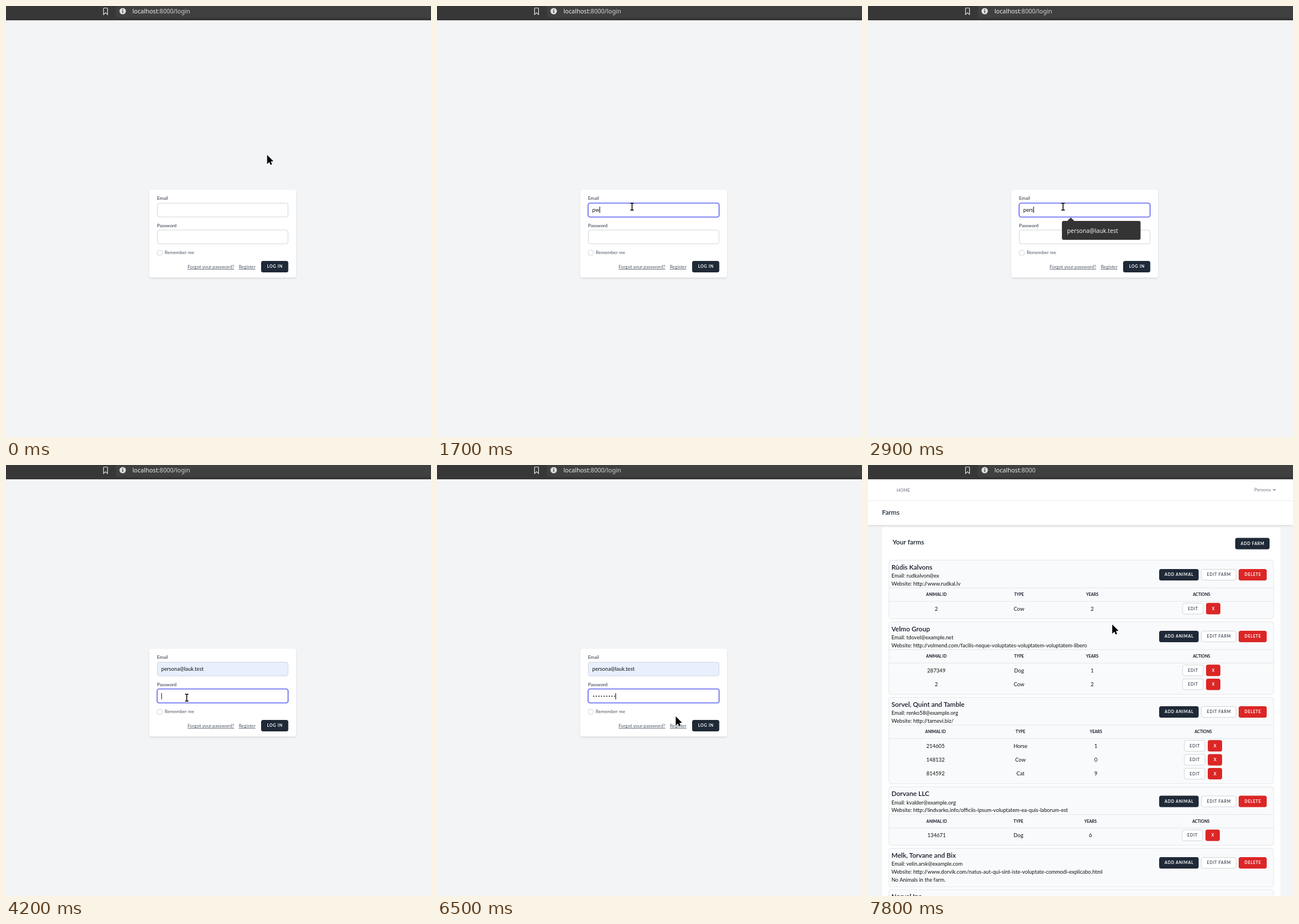
Animation of 743 by 754 pixels, one loop 8 s. Source, as an HTML page:

```html
<!DOCTYPE html>
<html lang="en">
<head>
<meta charset="utf-8">
<title>Farm login</title>
<style>
  html, body { margin: 0; width: 100%; height: 100%; overflow: hidden; background: #f3f4f6; }
  svg { display: block; width: 100%; height: 100%; font-family: Lato, "Open Sans", sans-serif; }
  .ui { font-family: "Noto Sans", "Open Sans", sans-serif; }
</style>
</head>
<body>
<svg id="stage" viewBox="0 0 743 754" xmlns="http://www.w3.org/2000/svg">
  <defs>
    <filter id="soft" x="-5%" y="-5%" width="110%" height="112%">
      <feDropShadow dx="0" dy="1.5" stdDeviation="1.5" flood-opacity=".12"/>
    </filter>
  </defs>
  <g id="login"></g>
  <g id="farms"></g>
  <g id="chrome"></g>
  <g id="pointer"></g>
</svg>
<script>
const LOOP = 8000, STEP = 100;
const INK = '#1f2937', RED = '#dc2626', LINE = '#d1d5db', RULE = '#e5e7eb', FOCUS = '#6366f1';
const EMAIL = 'persona@lauk.test';
const $ = id => document.getElementById(id);

const attrs = o => Object.entries(o).map(([k, v]) => ` ${k}="${v}"`).join('');
const rect = (x, y, width, height, fill, more = {}) =>
  `<rect${attrs({ x, y, width, height, fill, ...more })}/>`;
const text = (x, y, size, fill, str, more = {}) =>
  `<text${attrs({ x, y, 'font-size': size, fill, ...more })}>${str}</text>`;
const path = (d, more) => `<path${attrs({ d, fill: 'none', ...more })}/>`;
const mid = { 'text-anchor': 'middle' };
const hline = (x1, x2, y, color) => rect(x1, y, x2 - x1, 1, color);

function button(x, y, w, label, kind = 'dark') {
  const fill = { dark: INK, red: RED, plain: '#fff', hover: '#374151' }[kind];
  const plain = kind === 'plain';
  const edge = plain ? { stroke: LINE } : {};
  const inset = plain ? .5 : 0;
  return rect(x + inset, y + inset, w - 2 * inset, 20 - 2 * inset, fill, { rx: 3.5, ...edge }) +
    text(x + w / 2 + .35, y + 12.4, 6.9, plain ? '#374151' : '#fff', label,
      { ...mid, 'font-weight': plain ? 600 : 700, 'letter-spacing': '.1em' });
}

// Address bar
function chrome(url) {
  const [host, rest] = [url.slice(0, 9), url.slice(9)];
  return rect(0, 0, 743, 25, '#373737') +
    rect(192, -10, 560, 30.5, '#404040', { rx: 4 }) +
    rect(0, 24, 743, 1, '#303030') +
    path('M170.5 4.5Q170.5 3.5 171.5 3.5H176.5Q177.500 3.5 177.500 4.5V15L174 11.800 170.500 15Z',
      { stroke: '#e0e0e0', 'stroke-width': 1.2 }) +
    '<circle cx="204" cy="9" r="5.6" fill="#dedede"/>' +
    rect(203.3, 8, 1.5, 4, '#404040') + rect(203.3, 5.6, 1.5, 1.5, '#404040') +
    text(221, 13, 10.6, '#ededed', `${host}<tspan fill="#d2d2d2">${rest}</tspan>`, { class: 'ui' });
}

// Login form
function field(y, focused, fill = '#fff') {
  return focused
    ? rect(264.2, y + .2, 229, 24.6, fill, { rx: 3.5, stroke: FOCUS, 'stroke-width': 1.6 })
    : rect(264.5, y + .5, 228.5, 24, fill, { rx: 3.5, stroke: LINE });
}

const caret = (x, y) => rect(x, y, 1, 11, '#111');

function suggestions(list, width, hover) {
  const rowH = 28.25, h = 33 + rowH * (list.length - 1);
  return path('M347.500 377L354.500 370 361.500 377Z', { style: 'fill:#343434' }) +
    rect(339, 376, width, h, '#343434', { rx: 3 }) +
    (hover ? rect(339, 379, width, 27, '#4a4a4a') : '') +
    list.map((s, i) => text(348, 396.5 + i * rowH, 10.2, '#eee', s,
      { class: 'ui', 'font-weight': 500 })).join('');
}

const ALL = [EMAIL, 'pelde@lauk.test', 'paraugs.viens@lauk.test', 'pasts@lauk.test', 'plava@lauk.test'];
const typed = [[0, ''], [1600, 'p'], [1700, 'pw'], [2300, 'p'], [2500, 'pe'], [2700, 'per'], [2900, 'pers'], [3500, EMAIL]];
const dotTimes = [4700, 4800, 5000, 5200, 5400, 5500, 5900, 5900, 6100];
const between = (t, a, b) => t >= a && t < b;

function matches(t) {
  if (between(t, 1600, 1700) || between(t, 2300, 2500)) return ALL;
  if (between(t, 2500, 2700)) return ALL.slice(0, 2);
  return between(t, 2700, 3700) ? ALL.slice(0, 1) : [];
}

function login(t) {
  const value = typed.filter(k => t >= k[0]).pop()[1];
  const dots = dotTimes.filter(d => t >= d).length;
  const emailFocus = between(t, 600, 4100), passFocus = between(t, 4100, 6900);
  const list = matches(t);
  const [px, py] = pointerAt(t);
  const hover = px > 446 && px < 493 && py > 446 && py < 466;
  const fade = t < 6900 ? 1 : t < 7000 ? .85 : t < 7100 ? .45 : .25;
  let out = rect(250.5, 321.5, 256.5, 153.5, '#fff', { rx: 4, filter: 'url(#soft)' }) +
    text(264, 339.3, 8.1, '#374151', 'Email', { 'font-weight': 500 }) +
    field(344.5, emailFocus, t >= 3500 ? '#e8f0fe' : '#fff') +
    `<text id="entry" x="271.500" y="360" font-size="9.2" fill="#111">${value}</text>` +
    text(264, 386.600, 8.1, '#374151', 'Password', { 'font-weight': 500 }) +
    field(391.5, passFocus) +
    rect(264.5, 427.5, 8.500, 8.500, '#fff', { rx: 2, stroke: LINE }) +
    text(277.500, 434.2, 8.15, '#4b5563', 'Remember me');
  for (let i = 0; i < dots; i++)
    out += `<circle cx="${274 + 4.55 * i}" cy="404.5" r="1.05" fill="#111"/>`;
  for (const [x, label] of [[317.500, 'Forgot your password?'], [407, 'Register']])
    out += text(x, 459.2, 8.2, '#4b5563', label, { 'text-decoration': 'underline' });
  out += `<g opacity="${fade}">${button(446, 446, 47.5, 'LOG IN', hover ? 'hover' : 'dark')}</g>`;
  if (passFocus && t >= 4200 && t < 6600) out += caret(271.5 + 4.5 * dots, 399);
  if (list.length) out += suggestions(list, list.length > 2 ? 175 : 137.5, t >= 3500);
  $('login').innerHTML = out;
  if (between(t, 600, 1200) || between(t, 1600, 3500)) {
    const w = value ? $('entry').getComputedTextLength() : 0;
    $('login').insertAdjacentHTML('beforeend', caret(271.800 + w, 351));
  }
}

// Farm list
const COLS = [119.5, 264, 392, 583];
const FARMS = [
  { y: 166, name: 'Rūdis Kalvons', mail: 'rudkalvon@ex', site: 'www.rudkal.lv', cols: COLS, rows: [[2, 'Cow', 2]] },
  { y: 274, name: 'Velmo Group', mail: 'tdovel@example.net', cols: COLS,
    site: 'volmend.com/facilis-neque-voluptates-voluptatem-voluptatem-libero',
    rows: [[287349, 'Dog', 1], [2, 'Cow', 2]] },
  { y: 406, name: 'Sorvel, Quint and Tamble', mail: 'renko58@example.org', site: 'tarnevi.biz/',
    cols: [118, 266.5, 398.5, 586], rows: [[214605, 'Horse', 1], [148132, 'Cow', 0], [814592, 'Cat', 9]] },
  { y: 562.5, name: 'Dorvane LLC', mail: 'kvalder@example.org',
    site: 'lindvarko.info/officiis-ipsum-voluptatem-ea-quis-laborum-est',
    cols: [120, 263, 389, 582], rows: [[134671, 'Dog', 6]] },
  { y: 670, name: 'Melk, Torvane and Bix', mail: 'velin.arsk@example.com',
    site: 'www.dorvik.com/natus-aut-qui-sint-iste-voluptate-commodi-explicabo.html', rows: [] },
  { y: 742.5, name: 'Norvel Inc', mail: 'info@example.com', site: 'example.com', rows: [] }
];

function farm({ y, name, mail, site, cols, rows }) {
  const h = rows.length ? 78.5 + 24.4 * rows.length : 68;
  let out = rect(36.5, y + .5, 672.5, h - .5, '#f9fafb', { rx: 4, stroke: RULE }) +
    text(41, y + 16.5, 11.6, '#111827', name, { 'font-weight': 600 }) +
    text(41, y + 31, 9.2, '#111', `Email: ${mail}`) +
    text(41, y + 44.700, 9.2, '#111', `Website: http://${site}`) +
    button(509, y + 16, 69, 'ADD ANIMAL') +
    button(582.5, y + 16, 61.5, 'EDIT FARM', 'plain') +
    button(648, y + 16, 49, 'DELETE', 'red');
  if (!rows.length) return out + text(41, y + 58.5, 9.2, '#111', 'No Animals in the farm.');
  out += hline(37, 709, y + 48.5, RULE) + hline(37, 709, y + 72, RULE);
  ['ANIMAL ID', 'TYPE', 'YEARS', 'ACTIONS'].forEach((label, i) => {
    out += text(cols[i], y + 63, 6.9, '#111827', label, { ...mid, 'font-weight': 700 });
  });
  rows.forEach((row, r) => {
    const cy = y + 85.3 + 24.4 * r;
    row.forEach((v, i) => { out += text(cols[i], cy + 3.2, 9.2, '#111', v, mid); });
    out += button(cols[3] - 33.5, cy - 10, 37, 'EDIT', 'plain') +
      button(cols[3] + 8, cy - 10, 25, 'X', 'red');
  });
  return out;
}

$('farms').innerHTML =
  rect(0, 25, 743, 729, '#f3f4f6') +
  rect(0, 25, 743, 80, '#fff', { filter: 'url(#soft)' }) +
  hline(0, 743, 62, '#eceef1') +
  text(50, 47, 7.6, '#6b7280', 'HOME') +
  text(675.5, 46, 8.1, '#6b7280', 'Persona') +
  path('M708 42.2L710.300 44.500 712.600 42.2', { stroke: '#6b7280', 'stroke-width': 1.2 }) +
  text(24.5, 87, 11.6, INK, 'Farms', { 'font-weight': 600 }) +
  rect(25, 109, 696, 660, '#fff', { rx: 4 }) +
  text(43, 139, 11.6, '#111827', 'Your farms', { 'font-weight': 600 }) +
  button(642, 127.5, 60, 'ADD FARM') +
  FARMS.map(farm).join('');

// Pointer: time, x, y
const TRACK = [
  [100, 456.5, 260.5], [200, 468, 320], [300, 481, 442], [400, 430, 400], [500, 348, 354], [600, 341, 351],
  [3300, 341, 351], [3600, 372, 394], [3700, 372, 394], [3900, 340, 442], [4100, 316, 407],
  [6100, 316, 407], [6700, 468, 456], [7300, 468, 456], [7500, 463.5, 448],
  [7600, 463.5, 448], [7700, 440, 330], [7800, 427, 279]
];

function pointerAt(t) {
  const i = TRACK.findIndex(k => k[0] >= t);
  if (i < 0) return TRACK[TRACK.length - 1].slice(1);
  if (i === 0) return TRACK[0].slice(1);
  const [a, b] = [TRACK[i - 1], TRACK[i]];
  const p = (t - a[0]) / (b[0] - a[0]);
  return [1, 2].map(n => a[n] + (b[n] - a[n]) * p);
}

function pointer(t) {
  const [x, y] = pointerAt(t);
  const overList = matches(t).length && x > 339 && y > 376;
  const overField = x > 264 && x < 493 && (between(y, 344, 369) || between(y, 391, 417));
  const beam = t < 7200 && overField && !overList;
  const shape = beam
    ? path('M-3 -6H-1.200Q0 -6 0 -5Q0 -6 1.200 -6H3M0 -5.500V5.500M-3 6H-1.200Q0 6 0 5Q0 6 1.200 6H3',
        { stroke: '#000', 'stroke-width': 1.5 })
    : path('M0 0V16L3.8 12.6 6 17.4 8.500 16.2 6.400 11.500 11 11Z',
        { style: 'fill:#000', stroke: '#fff', 'stroke-width': .9, 'paint-order': 'stroke' });
  return `<g transform="translate(${x} ${y})">${shape}</g>`;
}

let shown = -1;
function render(ms) {
  const t = Math.floor(ms % LOOP / STEP) * STEP;
  if (t === shown) return;
  shown = t;
  const signedIn = t >= 7200;
  $('farms').style.display = signedIn ? '' : 'none';
  $('login').style.display = signedIn ? 'none' : '';
  if (!signedIn) login(t);
  $('chrome').innerHTML = chrome(signedIn ? 'localhost:8000' : 'localhost:8000/login');
  $('pointer').innerHTML = pointer(t);
}

const start = performance.now();
function tick() {
  render(performance.now() - start);
  requestAnimationFrame(tick);
}
tick();
</script>
</body>
</html>
```
